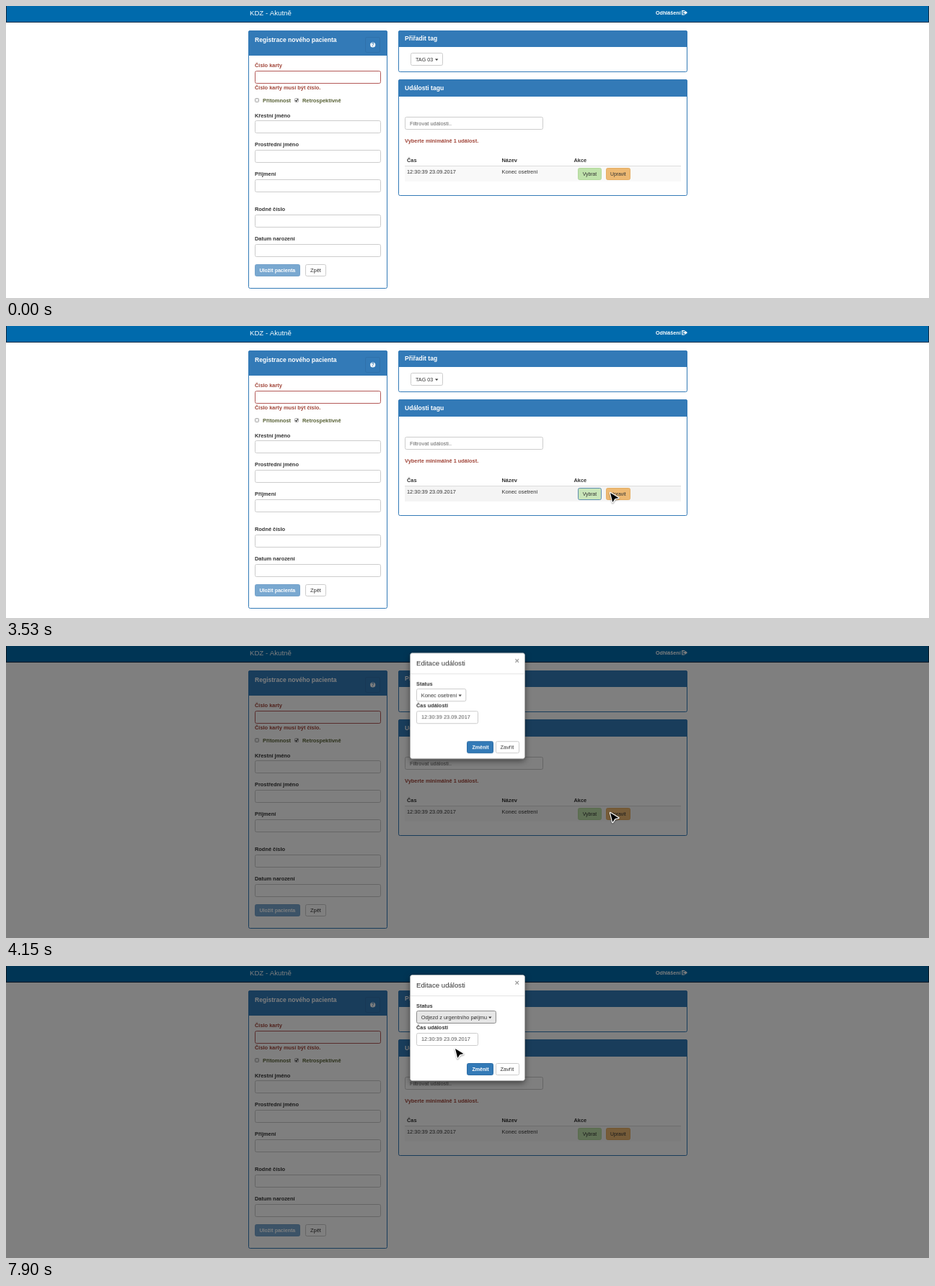
Recreate the animation shown at these times as an HTML page with a canvas. Size 1280 by 406 pixels, loop 8000 ms.

```html
<!DOCTYPE html>
<html lang="cs">
<head>
<meta charset="utf-8">
<title>Registrace pacienta</title>
<style>
  html, body { margin: 0; width: 100%; height: 100%; overflow: hidden; background: #fff; }
  canvas { display: block; width: 1280px; height: 406px; }
</style>
</head>
<body>
<canvas id="stage" width="1280" height="406"></canvas>
<script>
const W = 1280, H = 406, LOOP = 8000;
const BLUE = '#337ab7', RED = '#a04438', INK = '#333', GREY = '#ccc';
const BODY = 7.42, HEAD = 8.55, TITLE = 9.64;

const screen = document.getElementById('stage').getContext('2d');
const layer = document.createElement('canvas');
layer.width = W;
layer.height = H;
const layerCtx = layer.getContext('2d');
let g = screen;

const STATUS = ['Pøíjem pacienta', 'Stanovení pracovní diagnózy', 'Konec osetrení',
  'Odjezd z urgentního pøíjmu', 'Pøedání pacienta', 'Návrat na urgentní pøíjem'];
const TIME = '12:30:39 23.09.2017';

// Pointer path: time, x, y
const PATH = [
  [60, 1172, 398], [880, 811, 234], [2250, 810, 233], [2700, 810, 233],
  [3300, 838, 232], [4150, 838, 232], [4900, 619, 64], [5280, 619, 64],
  [5650, 609, 88], [5800, 609, 88], [6150, 616, 68], [6350, 616, 68],
  [7050, 621, 128], [7700, 621, 128], [7890, 623, 115]
];
const CLICKS = [1250, 2300, 3680, 5060, 5680, 6200, 7250];
const MODAL_AT = 3900;

const clamp = v => Math.max(0, Math.min(1, v));
const within = (t, a, b) => t >= a && t < b;

function pointer(t) {
  let i = 0;
  while (i < PATH.length - 2 && t > PATH[i + 1][0]) i++;
  const [ta, xa, ya] = PATH[i], [tb, xb, yb] = PATH[i + 1];
  const p = clamp((t - ta) / (tb - ta)), e = p * p * (3 - 2 * p);
  return { x: xa + (xb - xa) * e, y: ya + (yb - ya) * e };
}

function text(s, x, cy, { size = BODY, color = INK, bold = false } = {}) {
  g.font = `${bold ? 'bold ' : ''}${size}px "Liberation Sans", Arial, sans-serif`;
  g.fillStyle = color;
  g.fillText(s, x, cy + size * 0.36);
  return g.measureText(s).width;
}

function rect(x, y, w, h, color) {
  g.fillStyle = color;
  g.fillRect(x, y, w, h);
}

function box(x, y, w, h, fill, stroke, r = 2) {
  g.beginPath();
  g.roundRect(x + 0.5, y + 0.5, w - 1, h - 1, r);
  g.fillStyle = fill;
  g.fill();
  if (stroke) {
    g.strokeStyle = stroke;
    g.lineWidth = 1;
    g.stroke();
  }
}

function shadowed(blur, dy, alpha, draw) {
  g.save();
  g.shadowColor = `rgba(0,0,0,${alpha})`;
  g.shadowBlur = blur;
  g.shadowOffsetY = dy;
  draw();
  g.restore();
}

function poly(points, color) {
  g.beginPath();
  points.forEach(([x, y]) => g.lineTo(x, y));
  g.closePath();
  g.fillStyle = color;
  g.fill();
}

function disc(x, y, r, color) {
  g.beginPath();
  g.arc(x, y, r, 0, Math.PI * 2);
  g.fillStyle = color;
  g.fill();
}

const caret = (x, y) => poly([[x, y - 1], [x + 4.4, y - 1], [x + 2.2, y + 1.4]], INK);

function panel(x, y, w, h, headH, title, titleY) {
  box(x, y, w, h, '#fff', BLUE);
  g.beginPath();
  g.roundRect(x, y, w, headH, [2.5, 2.5, 0, 0]);
  g.fillStyle = BLUE;
  g.fill();
  text(title, x + 9, titleY, { size: HEAD, color: '#fff', bold: true });
}

function field(label, labelY, y) {
  text(label, 345, labelY, { bold: true });
  box(345, y, 175, 18, '#fff', GREY);
}

function checkbox(x, y, on) {
  box(x, y, 6, 6, on ? '#f4f4f4' : '#eee', '#a8a8a8', 1);
  if (!on) return;
  g.beginPath();
  g.moveTo(x + 1.3, y + 3);
  g.lineTo(x + 2.6, y + 4.5);
  g.lineTo(x + 4.8, y + 1.3);
  g.strokeStyle = '#333';
  g.lineWidth = 1.1;
  g.stroke();
}

function navbar() {
  rect(0, 0, W, 23, '#006aac');
  rect(0, 22, W, 1, '#0b2c47');
  rect(0, 0, 1, 23, '#0b2c47');
  rect(W - 1, 0, 1, 23, '#0b2c47');
  text('KDZ - Akutně', 338, 9.5, { size: TITLE, color: '#fff' });
  text('Odhlášení', 901, 9.5, { size: 7.2, color: '#fff', bold: true });
  g.strokeStyle = '#fff';
  g.lineWidth = 1.2;
  g.beginPath();
  g.moveTo(941, 6.6);
  g.lineTo(937.7, 6.6);
  g.lineTo(937.7, 12);
  g.lineTo(941, 12);
  g.stroke();
  rect(939.3, 8.4, 2.7, 1.8, '#fff');
  poly([[941.5, 6.3], [945, 9.3], [941.5, 12.3]], '#fff');
}

function patientForm() {
  panel(336, 34, 193, 359, 35, 'Registrace nového pacienta', 46.5);
  box(498, 43, 21, 22, BLUE, '#2f71ab');
  disc(508.7, 54, 3.6, '#fff');
  text('?', 506.7, 54, { size: 6.6, color: BLUE, bold: true });

  text('Číslo karty', 345, 82, { color: RED, bold: true });
  box(345, 90, 175, 18, '#fff', '#b35a58');
  text('Číslo karty musí být číslo.', 345, 113, { color: RED, bold: true });
  checkbox(345, 128, false);
  text('Přítomnost', 356, 131, { color: '#566034', bold: true });
  checkbox(400, 128, true);
  text('Retrospektivně', 411, 131, { color: '#566034', bold: true });

  field('Křestní jméno', 152, 159);
  field('Prostřední jméno', 192, 200);
  field('Příjmení', 233, 241);
  field('Rodné číslo', 282, 290);
  field('Datum narození', 323, 331);

  box(345, 359, 63, 17, '#79a8d0', '#74a2ca');
  text('Uložit pacienta', 351.5, 367.5, { size: 7.05, color: '#fff', bold: true });
  box(415, 359, 29, 17, '#fff', GREY);
  text('Zpět', 422, 367.5);
}

function tagPanels(t, p) {
  panel(544, 34, 401, 58, 23, 'Přiřadit tag', 45);
  box(561, 65, 45, 18, '#fff', GREY);
  text('TAG 03', 568, 74, { size: 7.2 });
  caret(595, 74.5);

  panel(544, 102, 401, 162, 24, 'Události tagu', 114);
  box(553, 154, 192, 18, '#fff', GREY);
  text('Filtrovat události..', 560, 163, { color: '#666' });
  if (!within(t, 1300, 2350))
    text('Vyberte minimálně 1 událost.', 553, 187, { color: RED, bold: true });

  text('Čas', 556, 214, { bold: true });
  text('Název', 687.5, 214, { bold: true });
  text('Akce', 787.5, 214, { bold: true });
  const overRow = t < MODAL_AT && p.x > 553 && p.x < 936 && p.y > 222 && p.y < 244;
  rect(553, 222, 383, 22, overRow ? '#f4f4f4' : '#f9f9f9');
  rect(553, 222, 383, 1, '#ddd');
  text(TIME, 556, 230.3);
  text('Konec osetrení', 687.5, 230.3);

  const focused = within(t, 1250, 3680);
  box(793, 225, 33, 17, focused ? '#c9e6ba' : '#bfe2ab', focused ? '#5f8fb0' : '#b3d99d');
  text('Vybrat', 799.7, 233.3, { size: 6.85 });
  box(832, 225, 34, 17, '#edb973', '#e5ae64');
  text('Upravit', 838, 233.3, { size: 6.85 });
}

function dropdown(p) {
  shadowed(6, 3, 0.2, () => box(569, 81, 118, 85, '#fff', null));
  box(569, 81, 118, 85, '#fff', '#c4c4c4');
  STATUS.forEach((s, i) => {
    const y = 91 + i * 13.1;
    if (p.x > 570 && p.x < 687 && Math.abs(p.y - y) < 6.5) rect(570, y - 6.5, 116, 13, '#f5f5f5');
    text(s, 580, y);
  });
}

function modal(t, p) {
  const open = within(t, 5130, 5720) || within(t, 6250, 7300);
  const status = STATUS[t < 5720 ? 2 : t < 7300 ? 0 : 3];

  shadowed(9, 3, 0.5, () => box(560, 12, 160, 148, '#fff', null, 3));
  box(560, 12, 160, 148, '#fff', 'rgba(0,0,0,.2)', 3);
  text('Editace události', 569, 27, { size: TITLE });
  text('×', 705.5, 23, { size: 11, color: '#999', bold: true });
  rect(561, 41, 158, 1, '#e5e5e5');

  text('Status', 569, 55, { bold: true });
  g.font = `${BODY}px "Liberation Sans", Arial, sans-serif`;
  const labelW = g.measureText(status).width;
  const fill = open ? '#d4d4d4' : t > 5060 ? '#e6e6e6' : '#fff';
  box(569, 62, labelW + 19.5, 18, fill, t > 5060 ? '#8c8c8c' : GREY);
  text(status, 575.7, 71);
  caret(577.7 + labelW, 71.5);

  text('Čas události', 569, 85, { bold: true });
  box(569, 93, 86, 18, '#fff', GREY);
  text(TIME, 576, 101.5, { color: '#555' });

  box(639, 135, 37, 17, BLUE, '#2e6da4');
  text('Změnit', 646.5, 143.5, { size: 7.05, color: '#fff', bold: true });
  box(679, 135, 33, 17, '#fff', GREY);
  text('Zavřít', 685.5, 143.5);

  if (open) dropdown(p);
}

function drawModal(t, p) {
  const fade = clamp((t - MODAL_AT) / 150);
  const slide = 1 - clamp((t - MODAL_AT) / 350);
  rect(0, 0, W, H, `rgba(0,0,0,${0.5 * fade})`);
  g = layerCtx;
  g.clearRect(0, 0, W, H);
  modal(t, p);
  g = screen;
  g.globalAlpha = fade;
  g.drawImage(layer, 0, -35 * slide * slide);
  g.globalAlpha = 1;
}

function drawPointer(t, { x, y }) {
  g.save();
  g.translate(x, y);
  g.beginPath();
  [[0, 0], [11.5, 7], [6.3, 8.3], [3.3, 13]].forEach(([a, b]) => g.lineTo(a, b));
  g.closePath();
  g.lineJoin = 'round';
  g.strokeStyle = '#fff';
  g.lineWidth = 2.4;
  shadowed(2, 1, 0.4, () => g.stroke());
  g.fillStyle = '#000';
  g.fill();
  if (CLICKS.some(c => within(t, c, c + 240))) {
    disc(9.5, 14, 5.8, '#fff');
    disc(9.5, 14, 5, '#111');
    disc(9.5, 14, 3.2, '#fff');
    disc(9.5, 14, 1.9, '#111');
  }
  g.restore();
}

function draw(t) {
  const p = pointer(t);
  rect(0, 0, W, H, '#fff');
  navbar();
  patientForm();
  tagPanels(t, p);
  if (t > MODAL_AT) drawModal(t, p);
  if (t >= 100) drawPointer(t, p);
}

const start = performance.now();
function tick() {
  draw((performance.now() - start) % LOOP);
  requestAnimationFrame(tick);
}
tick();
</script>
</body>
</html>
```
